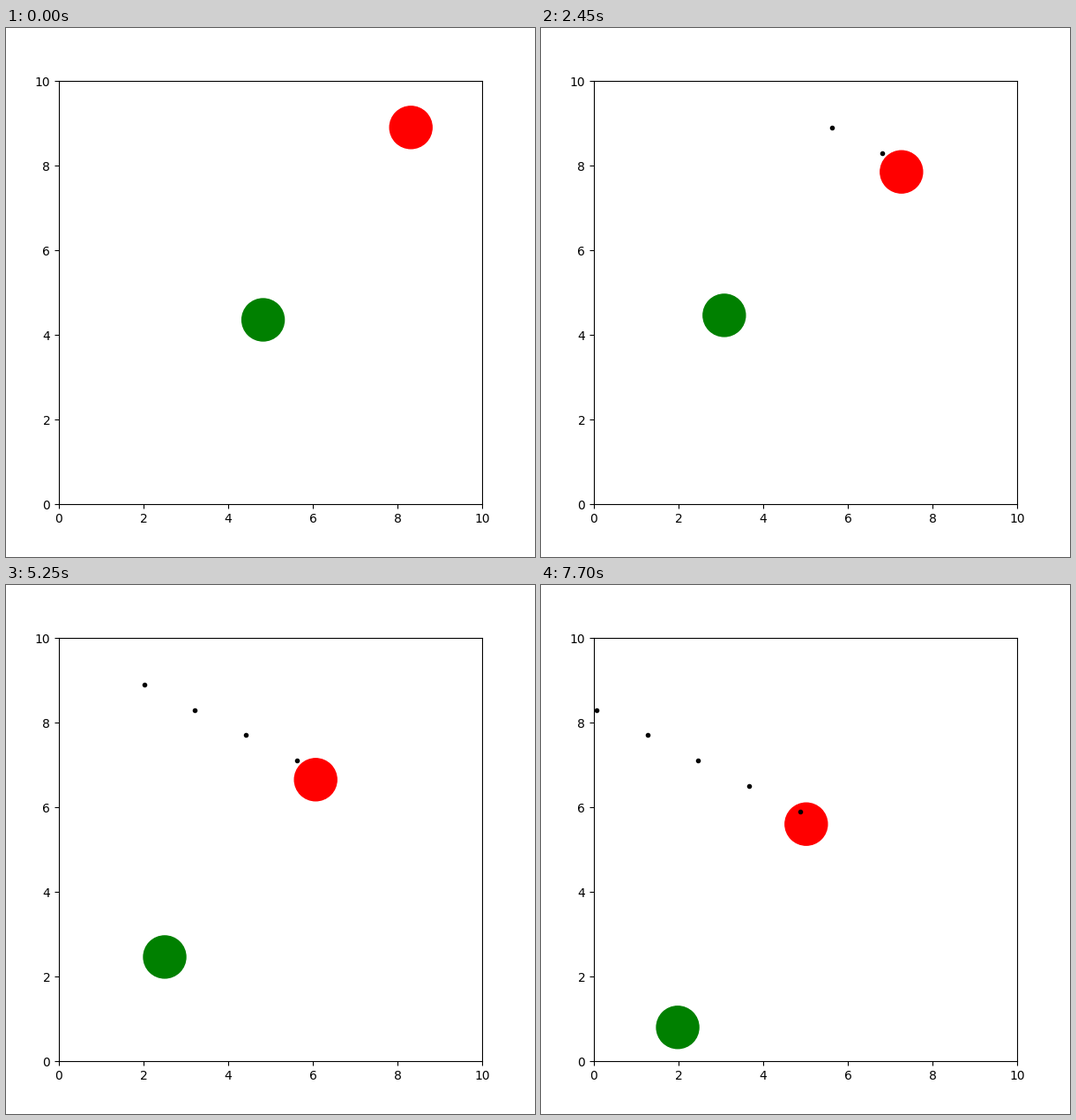
Write a matplotlib script that moves like this. It is 600 px wide and 600 px high and loops after 8 s.

```python
import numpy as np
import matplotlib.pyplot as plt
from matplotlib.animation import FuncAnimation

INTERVAL = 50      # ms per drawn frame
FRAMES = 160       # 8 s loop
HOLD = 7           # drawn frames per simulation step

START = np.array([8.317, 8.9])
SHIP_STEP = 0.15
SHOT_STEP = 0.45
RELOAD = 4         # steps between shots

# Wandering path of the green ball, one point per step
GREEN_X = [4.825, 4.575, 4.325, 4.075, 3.825, 3.575, 3.325, 3.08, 2.83,
           2.65, 2.42, 2.32, 2.38, 2.44, 2.45, 2.50, 2.51, 2.515, 2.52,
           2.385, 2.25, 2.115, 1.98]
GREEN_Y = np.concatenate([[4.354, 4.604, 4.84, 5.03, 5.12],
                          4.96 - 0.25 * np.arange(16),
                          [1.047, 0.797]])

fig, ax = plt.subplots(figsize=(6, 6), dpi=100)
fig.subplots_adjust(left=0.1, right=0.9, bottom=0.1, top=0.9)
ax.set_xlim(0, 10)
ax.set_ylim(0, 10)

red = ax.add_patch(plt.Circle(START, 0.5, color="red"))
green = ax.add_patch(plt.Circle((GREEN_X[0], GREEN_Y[0]), 0.5, color="green"))
shots, = ax.plot([], [], "k.")


def red_pos(step):
    return START - SHIP_STEP * step


def shot_positions(step):
    """Shots leave the red ball one step after firing and fly left."""
    points = [red_pos(fired) - [SHOT_STEP * (step - fired - 1), 0]
              for fired in range(0, step, RELOAD)]
    return np.array(points).reshape(-1, 2)


def update(i):
    step = i // HOLD
    red.center = red_pos(step)
    green.center = GREEN_X[step], GREEN_Y[step]
    shots.set_data(*shot_positions(step).T)
    return red, green, shots


anim = FuncAnimation(fig, update, frames=FRAMES, interval=INTERVAL,
                     repeat=True, repeat_delay=0)
plt.show()
```
